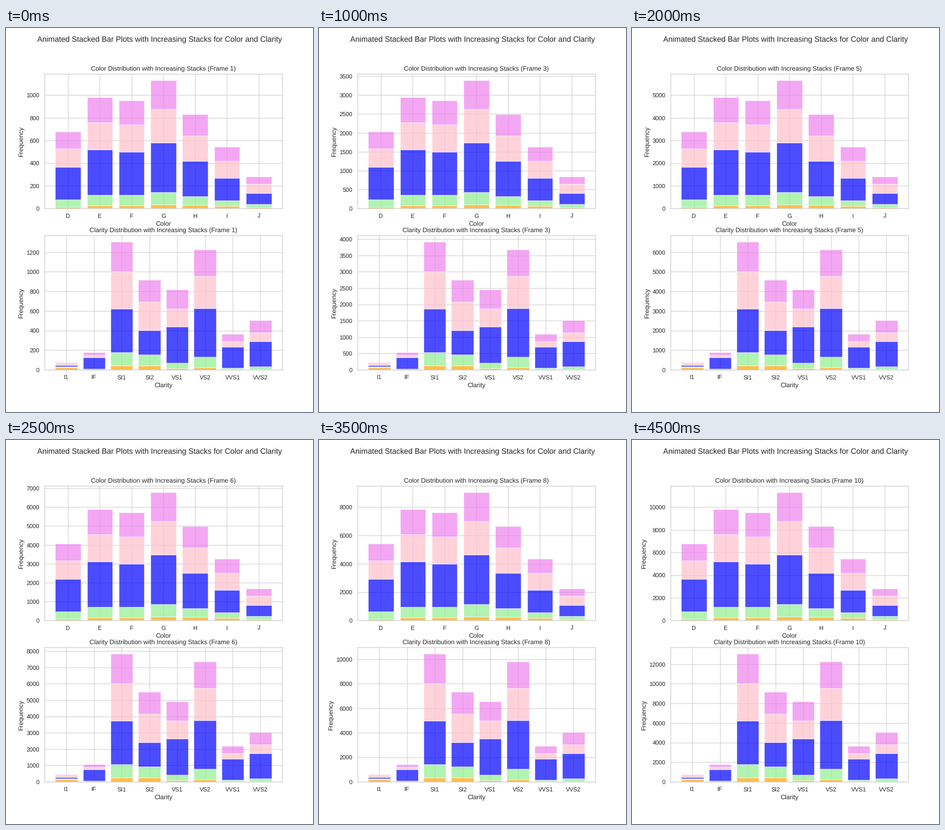
Recreate the animation shown at these times as a matplotlib script. Size 669 by 837 pixels, loop 5 s.

```python
import numpy as np
import matplotlib.pyplot as plt
from matplotlib.animation import FuncAnimation

DPI = 96
K = 83.7 / DPI  # scales point sizes to the stage
STEPS = 10
FILLS = ["orange", "lightgreen", "blue", "pink", "violet"]

plt.rcParams.update({
    "font.family": "Liberation Sans",
    "font.size": 12 * K,
    "text.color": ".15",
    "text.hinting": "none",
    "axes.titlesize": 12 * K,
    "axes.titlepad": 6 * K,
    "axes.labelsize": 12 * K,
    "axes.labelpad": 4 * K,
    "axes.labelcolor": ".15",
    "axes.edgecolor": ".8",
    "axes.linewidth": 1.25 * K,
    "axes.grid": True,
    "axes.axisbelow": True,
    "grid.color": ".8",
    "grid.linewidth": K,
    "patch.linewidth": K,
    "xtick.bottom": False,
    "ytick.left": False,
})
for side in ("xtick", "ytick"):
    plt.rcParams.update({
        f"{side}.labelsize": 11 * K,
        f"{side}.color": ".15",
        f"{side}.major.size": 6 * K,
        f"{side}.major.pad": 3.5 * K,
    })


def blend(ranks, keys, mixes):
    """Layer shares for each rank, between key mixes; the top layer is the rest."""
    lower = np.array([np.interp(ranks, keys, share) for share in zip(*mixes)])
    return np.vstack([lower, 1 - lower.sum(0)])


def draw(ax, name, bars, shares, step):
    ax.clear()
    totals = np.array(list(bars.values())) * step / STEPS
    base = np.zeros(len(bars))
    for share, fill in zip(shares, FILLS):
        ax.bar(list(bars), totals * share, bottom=base, color=fill,
               edgecolor="white", alpha=0.7)
        base += totals * share
    ax.set_ylim(0, totals.max() * 1.05)
    ax.set_title(f"{name} Distribution with Increasing Stacks (Frame {step})")
    ax.set_xlabel(name)
    ax.set_ylabel("Frequency")


# Bar heights at the last step
colors = dict(D=6775, E=9797, F=9542, G=11292, H=8304, I=5422, J=2808)
clarities = dict(I1=741, IF=1790, SI1=13065, SI2=9194,
                 VS1=8171, VS2=12258, VVS1=3655, VVS2=5066)

# The mix drifts evenly along the colors, and with purity along the clarities
color_mix = blend(range(7), [0, 6],
                  [(0.023, 0.094, 0.425, 0.234),
                   (0.040, 0.094, 0.350, 0.288)])
purity = ["IF", "VVS1", "VVS2", "VS1", "VS2", "SI1", "SI2", "I1"]
clarity_mix = blend([purity.index(c) for c in clarities], [0, 2, 4, 6, 7],
                    [(0.005, 0.040, 0.670, 0.130),
                     (0.010, 0.058, 0.500, 0.180),
                     (0.020, 0.085, 0.405, 0.270),
                     (0.045, 0.125, 0.270, 0.315),
                     (0.283, 0.130, 0.197, 0.277)])

fig, (top, low) = plt.subplots(2, 1, figsize=(669 / DPI, 837 / DPI), dpi=DPI)
fig.subplots_adjust(left=0.125, right=0.9, bottom=0.11, top=0.88, hspace=0.2)
fig.suptitle("Animated Stacked Bar Plots with Increasing Stacks for Color and Clarity",
             fontsize=14.4 * K)


def update(i):
    draw(top, "Color", colors, color_mix, i + 1)
    draw(low, "Clarity", clarities, clarity_mix, i + 1)
    return []


anim = FuncAnimation(fig, update, frames=STEPS, interval=500,
                     init_func=lambda: update(0), repeat=True, repeat_delay=0)
plt.show()
```
